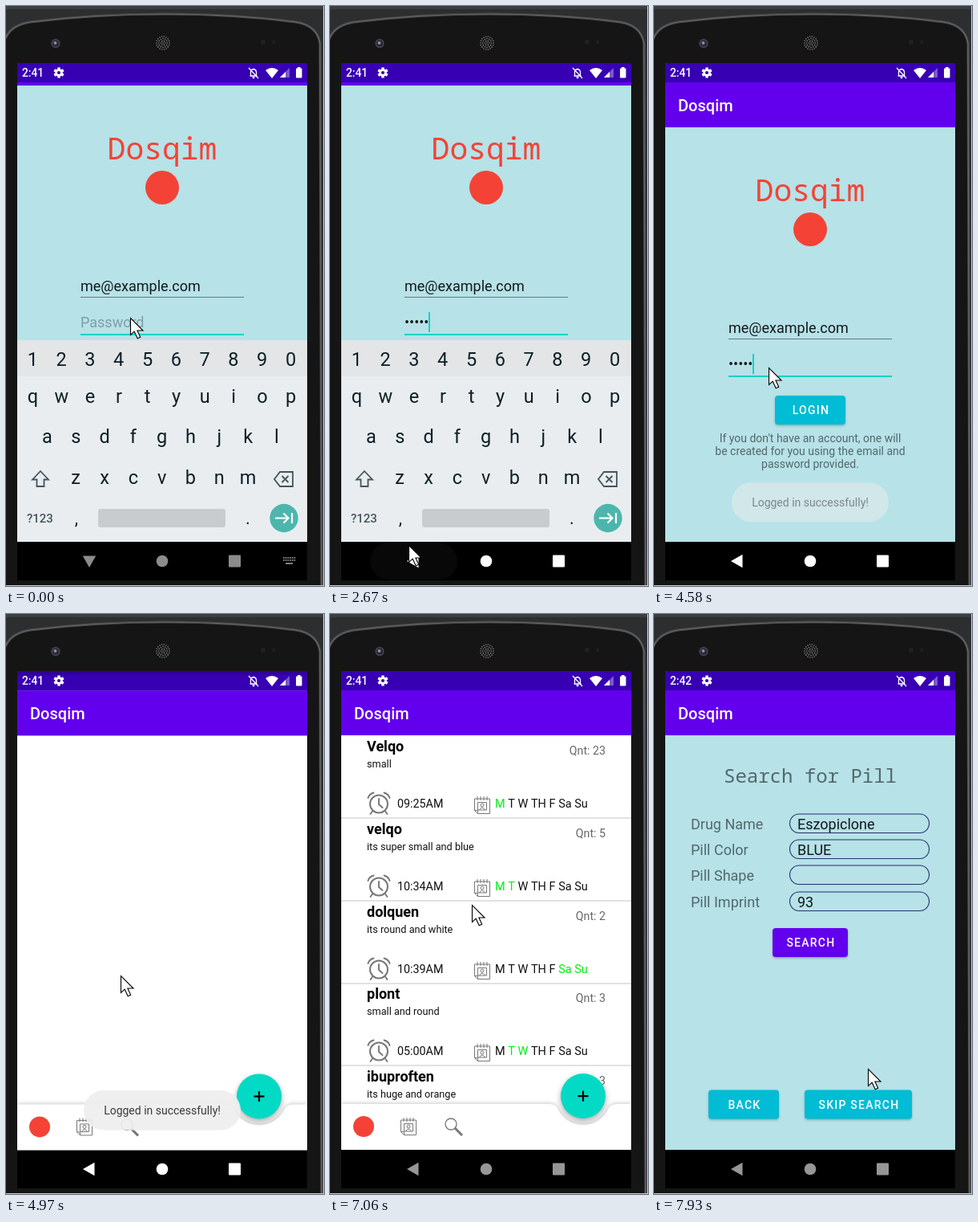
These frames come from a looping animation (397x722 px, 8000 ms). An HTML page with a canvas:

```html
<!DOCTYPE html>
<html lang="en">
<head>
<meta charset="utf-8">
<title>Pill reminder</title>
<style>
  html, body { margin: 0; width: 100%; height: 100%; overflow: hidden; background: #2c2e30; }
  canvas { display: block; width: 397px; height: 722px; }
</style>
</head>
<body>
<canvas id="stage" width="397" height="722"></canvas>
<script>
const ctx = document.getElementById('stage').getContext('2d');
const LOOP = 8000;
const SANS = 'Roboto, sans-serif';
const MONO = '"Noto Sans Mono", monospace';
const APP = 'Dosqim', EMAIL = 'me@example.com', SECRET = 'green';
const SKY = '#b6e2e8', PURPLE = '#6200ee', DEEP = '#3700b3', CYAN = '#00bcd4', TEAL = '#03dac5', RED = '#f44336';

const TICKS = [0, 550, 810, 930, 1050, 1170, 1290, 1840, 1970, 2120, 2240, 2390, 2540, 2670, 2820, 2970,
  3120, 3240, 3360, 3480, 3600, 3750, 4150, 4300, 4430, 4580, 4720, 4850, 4970, 5120, 5270, 5420, 5550,
  5670, 5820, 5970, 6090, 6240, 6390, 6510, 6630, 6780, 6910, 7060, 7210, 7330, 7450, 7570, 7690, 7810, 7930];

const POINTER = [[0, 155, 388], [1290, 155, 388], [1840, 158, 410], [1970, 138, 616], [2240, 98, 665],
  [2390, 98, 671], [2670, 98, 671], [2970, 159, 512], [3240, 166, 505], [3750, 166, 505], [4150, 156, 482],
  [4430, 143, 450], [5120, 143, 450], [5270, 155, 464], [5670, 222, 542], [5820, 283, 600], [6090, 320, 607],
  [6240, 324, 610], [6390, 324, 610], [6630, 225, 468], [6910, 185, 374], [7060, 177, 362], [7210, 177, 337],
  [7330, 180, 345], [7930, 267, 566]];

const PILLS = [
  ['Velqo', 'small', '09:25AM', 'M', 23],
  ['velqo', 'its super small and blue', '10:34AM', 'M T', 5],
  ['dolquen', 'its round and white', '10:39AM', 'Sa Su', 2],
  ['plont', 'small and round', '05:00AM', 'T W', 3],
  ['ibuproften', 'its huge and orange', '08:00AM', 'M', 3]];

const clamp = v => Math.max(0, Math.min(1, v));
const mix = (a, b, k) => a + (b - a) * k;
const ramp = (t, from, to) => clamp((t - from) / (to - from));
const grey = v => `rgb(${v},${v},${v})`;

function easeOpen(x) {
  let lo = 0, hi = 1, s = 0.5;
  for (let i = 0; i < 24; i++) {
    s = (lo + hi) / 2;
    if (1.2 * s * (1 - s) ** 2 + 0.6 * s * s * (1 - s) + s ** 3 < x) lo = s; else hi = s;
  }
  return s * s * (3 - 2 * s);
}

function pointerAt(t) {
  const i = POINTER.findIndex(k => k[0] > t);
  if (i < 0) return POINTER[POINTER.length - 1].slice(1);
  const a = POINTER[i - 1], b = POINTER[i], k = ramp(t, a[0], b[0]);
  return [mix(a[1], b[1], k), mix(a[2], b[2], k)];
}

function scoped(draw) { ctx.save(); draw(); ctx.restore(); }

function rect(x, y, w, h, color) { ctx.fillStyle = color; ctx.fillRect(x, y, w, h); }

function disc(x, y, r, color) {
  ctx.beginPath(); ctx.arc(x, y, r, 0, 7); ctx.fillStyle = color; ctx.fill();
}

function round(x, y, w, h, r, fill, stroke, line = 1) {
  ctx.beginPath(); ctx.roundRect(x, y, w, h, r);
  if (fill) { ctx.fillStyle = fill; ctx.fill(); }
  if (stroke) { ctx.strokeStyle = stroke; ctx.lineWidth = line; ctx.stroke(); }
}

function poly(points, fill) {
  ctx.beginPath();
  points.forEach(p => ctx.lineTo(...p));
  ctx.closePath(); ctx.fillStyle = fill; ctx.fill();
}

function stroke(path, color, line) {
  ctx.strokeStyle = color; ctx.lineWidth = line; ctx.stroke(new Path2D(path));
}

function text(str, x, y, size, color, { align = 'left', weight = 400, family = SANS, spacing = 0 } = {}) {
  ctx.font = `${weight} ${size}px ${family}`;
  ctx.textAlign = align;
  ctx.letterSpacing = spacing + 'px';
  ctx.fillStyle = color;
  ctx.fillText(str, x, y);
}

function shadow(blur, dy, alpha) {
  ctx.shadowColor = `rgba(0,0,0,${alpha})`; ctx.shadowBlur = blur; ctx.shadowOffsetY = dy;
}

function button(label, x, y, w, color, ripple = 0) {
  scoped(() => { shadow(3, 1.5, 0.26); round(x, y, w, 36, 4, color); });
  if (ripple) round(x, y, w, 36, 4, `rgba(255,255,255,${ripple})`);
  text(label, x + w / 2 + 0.9, y + 23, 14, '#fff', { align: 'center', weight: 500, spacing: 1.25 });
}

function device() {
  rect(0, 0, 397, 722, '#2c2e30');
  rect(0, 0, 397, 4, '#3c3f41');
  const body = 'M-2 44 Q4 24 30 20 Q110 10 198 10 Q286 10 362 20 Q388 24 392 46 L394 724 L-2 724 Z';
  ctx.fillStyle = '#151515'; ctx.fill(new Path2D(body));
  stroke(body, '#484848', 3);
  stroke(body, '#666', 1.2);
  rect(396, 0, 1, 722, '#c8c8c8');
  rect(0, 721, 397, 1, '#c8c8c8');
  disc(62, 46.5, 5.5, '#4c4c4c'); disc(62, 46.5, 4, '#232338'); disc(61.5, 46, 2, '#8d88ad');
  for (let r = 0; r < 4; r++)
    for (let i = 0; i < Math.max(1, r * 6); i++) {
      const a = i * Math.PI / 3 / Math.max(1, r);
      disc(196 + r * 2.7 * Math.cos(a), 46 + r * 2.7 * Math.sin(a), 0.85, '#777');
    }
  disc(321, 45, 3, '#202020'); disc(334, 45, 2.2, '#202020');
}

function statusIcons(t) {
  text(t < 7210 ? '2:41' : '2:42', 20, 88, 13.8, '#fff', { weight: 500 });
  scoped(() => {
    ctx.translate(66, 83);
    for (let i = 0; i < 6; i++) { ctx.rotate(Math.PI / 3); rect(-1.7, -6.6, 3.4, 5, '#fff'); }
    disc(0, 0, 4.8, '#fff'); disc(0, 0, 2.1, DEEP);
  });
  stroke('M304.500 87 H313.500 M305.500 87 V82 Q306 79 309 78.500 Q312 79 312.500 82 V87 M303 77 L315 90', '#fff', 1.3);
  disc(309, 89, 1.4, '#fff');
  ctx.fillStyle = '#fff';
  ctx.fill(new Path2D('M324 80 Q332 74 340 80 L332 90 Z'));
  poly([[342, 89], [354, 89], [354, 77]], 'rgba(255,255,255,.35)');
  poly([[342, 89], [349, 89], [349, 82]], '#fff');
  rect(364, 76, 3.5, 2, '#fff'); round(362, 77.5, 7.5, 12, 1, '#fff');
}

function appBar() {
  rect(14, 95, 362, 56, PURPLE);
  text(APP, 30, 131, 20, '#fff', { weight: 500 });
}

function login(t) {
  const pan = t < 2820 ? -52 : t < 2970 ? -10 : 0;
  rect(14, 95, 362, 572, SKY);
  scoped(() => {
    ctx.translate(0, pan);
    appBar();
    text(APP, 195, 243, 38, RED, { align: 'center', family: MONO });
    disc(195, 278, 21, RED);
    text(EMAIL, 93, 407, 18, '#14191b');
    rect(93, 414, 204, 1, '#66787c');
    rect(93, 460, 204, 2, '#0fd3c3');

    const typed = t < 810 ? 0 : Math.min(5, 1 + Math.floor((t - 810) / 120));
    const masked = t >= 2120 ? 5 : typed - 1;
    const shown = typed ? '•'.repeat(masked) + SECRET.slice(masked, typed) : '';
    text(shown || 'Password', 93, 452, 18, typed ? '#14191b' : '#7f9fa4');
    const caret = (t >= 550 && t < 1840) || (t >= 2240 && t < 2820) || (t >= 3120 && t < 3750) || t >= 4580;
    if (caret) rect(Math.floor(93 + (typed ? ctx.measureText(shown).width : 0)), 433, 2, 25, '#0fd3c3');

    button('LOGIN', 151, 485, 88, CYAN, t >= 3240 && t < 3750 ? 0.2 : 0);
    ["If you don't have an account, one will", 'be created for you using the email and', 'password provided.']
      .forEach((s, i) => text(s, 195, Math.round(542.6 + i * 16.4), 14, '#54686b', { align: 'center' }));
  });
  rect(14, 71, 362, 24, DEEP);
}

function alarmIcon(x, y) {
  scoped(() => {
    ctx.translate(x, y);
    ctx.lineCap = 'round';
    ctx.beginPath(); ctx.arc(0, 0.5, 11, 0, 7);
    ctx.strokeStyle = '#777'; ctx.lineWidth = 2; ctx.stroke();
    stroke('M0 -6 V1 L4.500 5 M-13.500 -7 Q-12 -12 -6.500 -13.500 M13.500 -7 Q12 -12 6.500 -13.500 M-8 9.500 L-10.500 13 M8 9.500 L10.500 13', '#777', 1.9);
  });
}

function calendarIcon(x, y) {
  scoped(() => {
    ctx.translate(x, y);
    stroke('M-9.500 -8 H9.500 V10.500 H-5.500 L-9.500 6.500 Z M-9.500 6.500 H-5.500 V10.500 M-6 -11 V-6 M-2 -11 V-6 M2 -11 V-6 M6 -11 V-6 M-5.500 -3.500 H5.500 V6 H-5.500 Z M-3.500 6 Q0 0 3.500 6', '#777', 1);
    ctx.beginPath(); ctx.arc(0, 0, 2, 0, 7); ctx.stroke();
  });
}

function pillRow([name, note, time, days, count], y) {
  text(name, 46, y + 19, 18, '#000', { weight: 700 });
  text(note, 46, y + 39, 12.7, '#111');
  text('Qnt: ' + count, 344, y + 23, 14.2, '#666', { align: 'right' });
  alarmIcon(61, y + 84);
  text(time, 84, y + 89, 14.3, '#111');
  calendarIcon(190, y + 86);
  let x = 206;
  for (const day of 'M T W TH F Sa Su'.split(' ')) {
    text(day, x, y + 89, 14.5, days.split(' ').includes(day) ? '#00f018' : '#111');
    x += ctx.measureText(day + ' ').width;
  }
  rect(14, y + 101, 362, 2, '#e2e2e2');
}

function pillList(t) {
  rect(14, 95, 362, 572, '#fff');
  if (t >= 5270) PILLS.forEach((pill, i) => pillRow(pill, Math.round(152 + i * 102.8)));
  appBar();
  rect(14, 71, 362, 24, DEEP);
  scoped(() => {
    ctx.beginPath(); ctx.rect(14, 560, 362, 107); ctx.clip();
    shadow(5, -1, 0.22);
    ctx.fillStyle = '#fff';
    ctx.fill(new Path2D('M14 610 H273 Q281 610 284 615 A35 35 0 0 0 348 615 Q351 610 359 610 H376 V667 H14 Z'));
  });
  disc(42, 638, 13, RED);
  calendarIcon(98, 638);
  ctx.beginPath(); ctx.arc(151, 635, 7, 0, 7);
  ctx.strokeStyle = '#777'; ctx.lineWidth = 1.3; ctx.stroke();
  stroke('M156 640 L165 649', '#777', 3);
  scoped(() => { shadow(7, 3, 0.35); disc(316, 600, 28, TEAL); });
  if (t >= 6390 && t < 7060) disc(316, 600, mix(12, 28, ramp(t, 6390, 6630)), 'rgba(255,255,255,.25)');
  rect(309.5, 599, 13, 2.2, '#000'); rect(314.9, 593.6, 2.2, 13, '#000');
}

function search() {
  rect(14, 95, 362, 572, SKY);
  appBar();
  rect(14, 71, 362, 24, DEEP);
  text('Search for Pill', 195, 210, 24, '#53686b', { align: 'center', family: MONO });
  [['Drug Name', 'Eszopiclone'], ['Pill Color', 'BLUE'], ['Pill Shape', ''], ['Pill Imprint', '93']]
    .forEach(([label, value], i) => {
      const y = Math.round(249 + i * 32.2);
      text(label, 46, y + 19, 18, '#53686b');
      round(169.5, y, 174, 23.5, 11.7, null, '#29306a', 1.1);
      text(value, 179, y + 18.5, 18, '#14191b');
    });
  button('SEARCH', 148, 391, 94, PURPLE);
  button('BACK', 68, 592.5, 88, CYAN);
  button('SKIP SEARCH', 188, 592.5, 134, CYAN);
}

function openScreen(from, to, k) {
  const p = easeOpen(k), drop = 26.4 * (1 - p);
  scoped(() => { ctx.translate(0, -13.2 * p); from(); });
  rect(14, 71, 362, 596, `rgba(0,0,0,${0.12 * clamp(k * 3)})`);
  scoped(() => {
    ctx.translate(0, drop);
    ctx.beginPath(); ctx.rect(14, 71 + 644 * 0.126 * Math.exp(-6 * (k - 0.36)), 362, 644); ctx.clip();
    to();
  });
}

function keyRow(keys, x, y) {
  [...keys].forEach((key, i) => text(key, x + i * 35.8, y, 23.5, '#0d1f26', { align: 'center' }));
}

function keyboard() {
  rect(14, 416, 362, 251, '#e9edf0');
  rect(14, 416, 362, 45, '#e3e5e7');
  keyRow('1234567890', 33.3, 448);
  keyRow('qwertyuiop', 33.5, 494);
  keyRow('asdfghjkl', 51.5, 544);
  keyRow('zxcvbnm', 87.2, 595);
  stroke('M43 579 L53 589.500 H47.500 V598 H38.500 V589.500 H33 Z', '#44555c', 1.8);
  stroke('M342 580 H358 V598 H342 L335 589 Z M344.500 585 L352.500 593 M352.500 585 L344.500 593', '#44555c', 1.8);
  text('?123', 26, 643, 15, '#44555c', { weight: 500 });
  text(',', 88, 645, 22, '#0d1f26', { align: 'center' });
  round(115, 626, 159, 23, 3, '#c8cccf');
  text('.', 302, 645, 22, '#0d1f26', { align: 'center' });
  disc(347, 637.5, 17.7, '#4db6ac');
  stroke('M336 637.500 H352 M346.500 631.500 L352.500 637.500 L346.500 643.500 M357 631 V644', '#fff', 2.2);
}

function navIcons(t) {
  const opened = ramp(t, 2450, 2670);
  const tone = grey(t < 5000 ? Math.round(mix(140, 255, opened)) : Math.round(mix(255, 150, ramp(t, 5000, 6100))));
  scoped(() => {
    ctx.translate(104, 691); ctx.rotate(-Math.PI / 2 * (1 - opened));
    poly([[-8, 0], [6.5, -8.2], [6.5, 8.2]], tone);
  });
  disc(195, 691, 7.3, tone);
  round(278, 683.5, 15, 15, 1, tone);
  if (opened < 1) scoped(() => {
    ctx.globalAlpha = 1 - opened;
    for (let i = 0; i < 6; i++) for (let j = 0; j < 2; j++) rect(346 + i * 2.7, 686 + j * 3, 1.7, 1.8, '#8c8c8c');
    rect(349, 693, 9, 1.8, '#8c8c8c');
  });
}

function toast(t) {
  const alpha = t < 4580 ? 0 : t < 4720 ? 0.5 : 0.92 * (1 - ramp(t, 6240, 6630));
  if (!alpha) return;
  scoped(() => {
    ctx.globalAlpha = alpha;
    round(97, 593, 196, 49.5, 24.7, '#eee');
    text('Logged in successfully!', 195, 623, 14, '#2a2a2a', { align: 'center' });
  });
}

function pointer(t) {
  const [x, y] = pointerAt(t);
  scoped(() => {
    ctx.translate(Math.round(x) + 0.5, Math.round(y) + 0.5);
    const arrow = new Path2D('M0 0 V21 L4.700 16.700 L8.700 25.300 L12.200 23.700 L8.400 15.500 H15.500 Z');
    ctx.fillStyle = '#fff'; ctx.fill(arrow);
    ctx.strokeStyle = '#000'; ctx.lineWidth = 1.1; ctx.stroke(arrow);
  });
}

function screen(t) {
  rect(14, 667, 362, 48, '#000');
  if (t >= 2540 && t < 3120) round(50, 668, 109, 46, 23, '#080808');
  const toList = (t - 4614) / 425, toSearch = (t - 7065) / 425;
  if (t < 4720) login(t);
  else if (toList < 1) openScreen(() => login(t), () => pillList(t), toList);
  else if (t < 7210) pillList(t);
  else if (toSearch < 1) openScreen(() => pillList(t), search, toSearch);
  else search();
  if (t < 2970) scoped(() => {
    if (t >= 2820) ctx.globalAlpha = 0.3;
    keyboard();
  });
  statusIcons(t);
  navIcons(t);
  toast(t);
}

function frame(now) {
  const time = now % LOOP;
  const t = TICKS.filter(tick => tick <= time).pop() || 0;
  device();
  scoped(() => {
    ctx.beginPath(); ctx.rect(14, 71, 362, 644); ctx.clip();
    screen(t);
  });
  pointer(t);
  requestAnimationFrame(frame);
}
requestAnimationFrame(frame);
</script>
</body>
</html>
```
